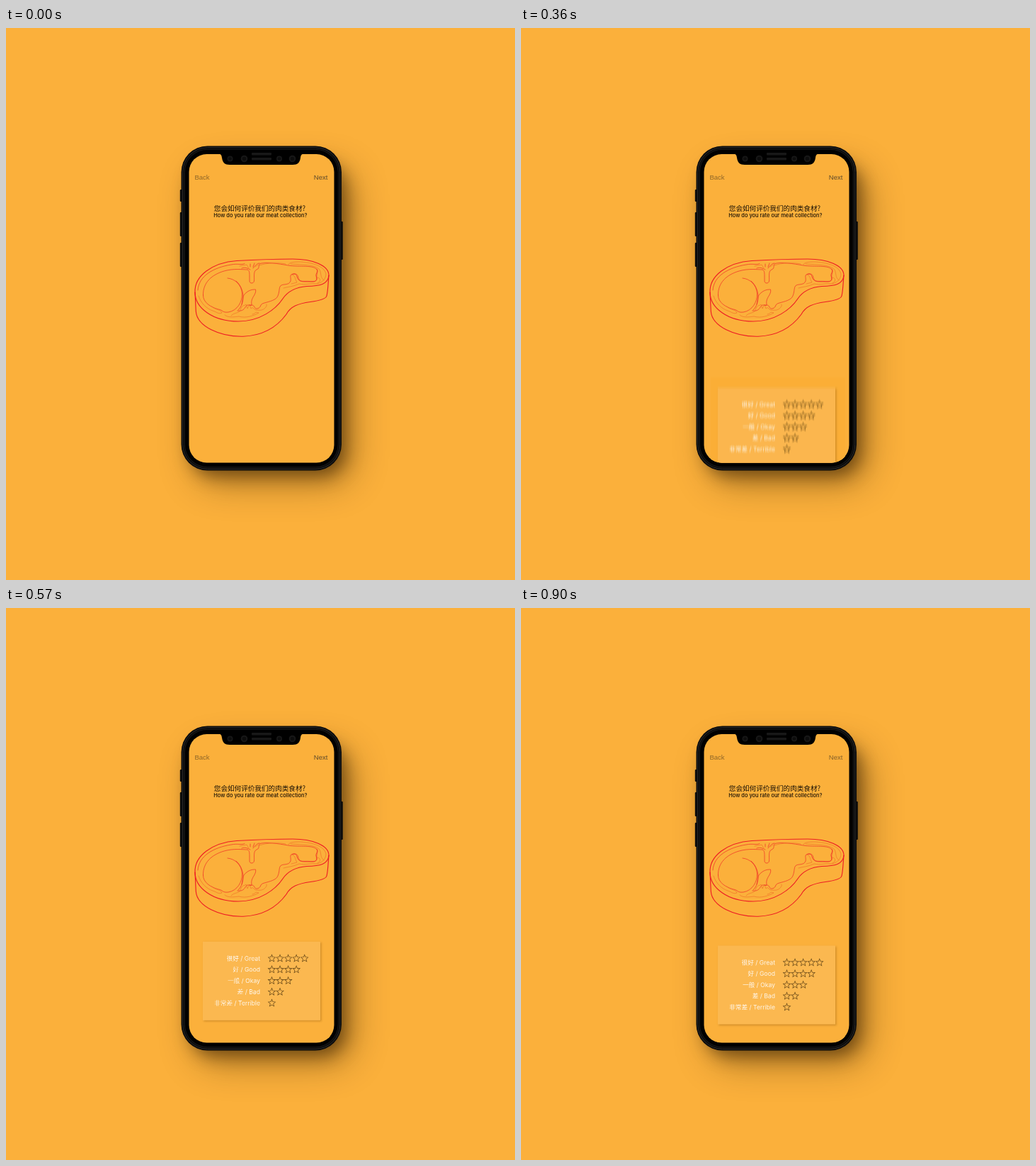
An HTML page with a canvas for the animation above (1.08 s loop, 719 by 779 pixels).

```html
<!DOCTYPE html>
<html lang="en">
<head>
<meta charset="utf-8">
<title>Rating screen</title>
<style>
html, body { margin: 0; width: 100%; height: 100%; overflow: hidden; background: #fbb03b; }
canvas { display: block; }
</style>
</head>
<body>
<canvas id="stage" width="719" height="779"></canvas>
<script>
const W = 719, H = 779, LOOP = 1080, STEP = 30;
const BG = '#fbb03b', RED = '#ed1c24', FINE = '#ee6a26';
const SANS = 'Inter, "Noto Sans CJK SC", "Noto Sans CJK", sans-serif';
const ctx = document.getElementById('stage').getContext('2d');

function layer(w, h, scale = 1) {
  const c = document.createElement('canvas');
  c.width = w * scale;
  c.height = h * scale;
  const g = c.getContext('2d');
  g.scale(scale, scale);
  return [c, g];
}

function box(g, x, y, w, h, r, fill) {
  g.beginPath();
  g.roundRect(x, y, w, h, r);
  g.fillStyle = fill;
  g.fill();
}

function ring(g, x, y, w, h, r, color, width) {
  g.beginPath();
  g.roundRect(x, y, w, h, r);
  g.strokeStyle = color;
  g.lineWidth = width;
  g.stroke();
}

function dot(g, x, y, r, fill) {
  g.beginPath();
  g.arc(x, y, r, 0, Math.PI * 2);
  g.fillStyle = fill;
  g.fill();
}

function line(g, d, color, width) {
  g.strokeStyle = color;
  g.lineWidth = width;
  g.stroke(new Path2D(d));
}

function label(g, text, x, y, font, color, align = 'left') {
  g.font = font;
  g.fillStyle = color;
  g.textAlign = align;
  g.fillText(text, x, y);
}

function drawPhone(g) {
  const cast = (dx, dy, blur, alpha) => {
    g.save();
    g.shadowColor = `rgba(50,28,0,${alpha})`;
    g.shadowBlur = blur;
    g.shadowOffsetX = dx;
    g.shadowOffsetY = dy;
    box(g, 252, 180, 220, 442, 34, '#000');
    g.restore();
  };
  cast(16, 20, 50, 0.42);
  cast(8, 10, 22, 0.5);

  for (const [y, h] of [[228, 17], [260, 34], [303, 34]]) box(g, 245.8, y, 4, h, 1, '#0c0c0c');
  box(g, 472, 273, 3.8, 54, 1, '#0c0c0c');
  box(g, 247.5, 166.5, 226.5, 458, 37, '#0b0b0b');
  ring(g, 249.6, 168.6, 222.3, 453.8, 35, '#2b2b2b', 1);
  ring(g, 252.3, 171.3, 216.9, 448.4, 32, '#1c1c1c', 0.8);
  box(g, 253, 172, 215.5, 447, 31.5, '#000');
  box(g, 258.5, 178, 205, 435.5, 25, BG);

  g.fillStyle = '#000';
  g.fill(new Path2D('M301 177H420V178C417 178 416.5 180 416 183C415 190 412 193 405 193H316C309 193 306 190 305 183C304.5 180 304 178 301 178Z'));
  for (const [x, r] of [[316.5, 4], [336.5, 4.8], [386, 4], [404.5, 4.8]]) {
    dot(g, x, 184.5, r, '#171717');
    dot(g, x, 184.5, r * 0.55, '#0c0c0c');
  }
  box(g, 347, 176, 28, 3.6, 1, '#181818');
  box(g, 347, 183, 28, 3.6, 1, '#181818');
}

function drawSteak(g) {
  g.lineJoin = g.lineCap = 'round';
  // fat and muscle
  for (const d of [
    'M271 370C272 350 293 338 318 334C328 332 333 335 337 332.5',
    'M278.5 377C278 359 291 348 308 343C322 339 334 341 341 341C344 342 344 346 344 351V357C344 361 350 361 350.5 357C351 351 349 343 354 341C360 339 354 333 361 332C374 330 391 334 402 335.5C418 337 438 334 440 343C440 346 438 349 439 352C440 358 435 358 428 357.5C421 357 415 359 413 353C412 347 409 346 404 347.5C400 349 403 353 402 357C400 363 393 361 389 363C385 365 387 371 384 378C382 384 372 386 365 388C357 390 362 394 355 396C350 397 352 391 347 391C342 392 341 389 338 394C336 398 332 400 327 399',
    'M278.5 377C278 387 289 394 300 397C307 398 305 402 314 401C327 399 334 386 333.5 375C333 363 324 354 313 353',
    'M328 398C333 393 335 386 335 379C335 369 329 360 325 357',
    'M333 390C335 382 333 378 340 373C345 369 350 369 352.5 369C354 375 348 379 347 385C346 389 349 393 344 391',
    'M404 348C407 346 410 347 411 351C413 358 418 358 424 358H434C438 358 440 355 438 350C437 346 442 344 439 340',
    'M345 341C341 339 338 337 333 339M349 339C352 335 355 332 358 332M345 337V333M349 337L351 332'
  ]) line(g, d, RED, 0.62);
  for (const d of [
    'M272 378C275 388 283 396 292 399C298 401 300 404 305 402C304 397 295 398 291 393',
    'M309 405C313 409 322 408 329 407C339 410 350 406 357 402C350 400 354 403 348 404',
    'M318 406C322 401 330 403 331 398C334 389 337 393 339 390L341 396L344 390L346 396C350 392 349 399 356 398C364 400 370 392 368 390',
    'M399 334C399 330 412 329 425 331C439 333 450 338 452 347C452 355 445 361 437 361C428 360 424 363 414 361C406 365 399 365 392 367',
    'M402 333C419 334 435 334 442 340C446 344 443 352 449 356M440 352C445 353 445 358 440 360',
    'M405 349C408 348 408 354 411 359L403 361M358 335C369 331 387 331 395 333',
    'M330 336L340 334L343 339M352 337L356 334'
  ]) line(g, d, FINE, 0.6);
  // outline and side
  line(g, 'M267 373C266 350 291 331 326 328.5C352 327 380 326 405 326C433 326 456 335 456 349C455 362 443 364 425 364.5C407 366 397 373 391 382C381 397 359 414 328 414C292 414 267 395 267 373Z', RED, 1.15);
  line(g, 'M267 373L268.3 400C270 421 302 436 335 435.2C366 434 385 419 396 404C402 393 412 389 430 386.5C441 385 452 383 453 378C455 370 455 359 456 349', RED, 1.15);
}

// Card sprite: opaque, with margins so that shifted copies can be averaged.
const CARD = { x: 268, w: 190, top: 14, h: 150 };
const ROWS = ['很好 / Great', '好 / Good', '一般 / Okay', '差 / Bad', '非常差 / Terrible'];

function star(g, x, y, r) {
  g.beginPath();
  for (let i = 0; i < 10; i++) {
    const a = i * Math.PI / 5 - Math.PI / 2, k = i % 2 ? r * 0.44 : r;
    g.lineTo(x + k * Math.cos(a), y + k * Math.sin(a));
  }
  g.closePath();
  g.stroke();
}

function drawCard(g) {
  g.fillStyle = BG;
  g.fillRect(0, 0, CARD.w, CARD.h);
  g.translate(-CARD.x, CARD.top);
  g.save();
  g.shadowColor = 'rgba(120,70,0,.32)';
  g.shadowBlur = 5;
  g.shadowOffsetX = g.shadowOffsetY = 3;
  g.fillStyle = '#fbb850';
  g.fillRect(278, 0, 166, 111);
  g.restore();
  g.strokeStyle = 'rgba(45,28,0,.72)';
  g.lineWidth = 0.7;
  ROWS.forEach((text, i) => {
    const y = 23.7 + i * 15.75;
    label(g, text, 359, y + 3.2, '8.6px ' + SANS, 'rgba(255,255,255,.9)', 'right');
    for (let n = 0; n < 5 - i; n++) star(g, 375.5 + n * 11.55, y + 0.2, 5.3);
  });
}

// Card top every 60 ms from 120 ms on.
const TOPS = [611, 586, 559.5, 532, 507.5, 488, 477, 472, 470, 470.3, 473, 475.8, 476.5];

function cardTop(t) {
  const u = (t - 120) / 60;
  if (u >= TOPS.length - 1) return 476.5;
  const i = Math.floor(u), f = u - i;
  const at = k => k < 0 ? TOPS[0] - 25 * k : TOPS[Math.min(k, TOPS.length - 1)];
  const [a, b, c, d] = [at(i - 1), at(i), at(i + 1), at(i + 2)];
  return b + f / 2 * (c - a + f * (2 * a - 5 * b + 4 * c - d + f * (3 * (b - c) + d - a)));
}

const [scene, sg] = layer(W, H);
sg.fillStyle = BG;
sg.fillRect(0, 0, W, H);
drawPhone(sg);
drawSteak(sg);
label(sg, 'Back', 266.5, 214, '9.5px "Liberation Sans", Arial, sans-serif', '#8f6729');
label(sg, '您会如何评价我们的肉类食材?', 293.8, 258.3, '9.6px "Noto Sans CJK SC", "Noto Sans CJK", sans-serif', '#1a1206');
label(sg, 'How do you rate our meat collection?', 293.3, 266.6, '500 7.45px ' + SANS, '#1a1206');

const [card, cg] = layer(CARD.w, CARD.h, 2);
drawCard(cg);

const screen = new Path2D();
screen.roundRect(258.5, 178, 205, 435.5, 25);

function render(t) {
  t = Math.floor(t / STEP) * STEP;
  ctx.drawImage(scene, 0, 0);
  label(ctx, 'Next', 434.8, 214, '9.5px "Liberation Sans", Arial, sans-serif', t < 900 ? '#5e4a2c' : '#84602a');
  if (t < 120) return;

  // Motion blur: running average over half a step.
  const shutter = STEP / 2;
  const travel = Math.abs(cardTop(t + shutter / 2) - cardTop(t - shutter / 2));
  const count = travel < 0.7 ? 1 : 10;
  ctx.save();
  ctx.clip(screen);
  for (let i = 0; i < count; i++) {
    const y = cardTop(t + shutter * ((i + 0.5) / count - 0.5));
    ctx.globalAlpha = 1 / (i + 1);
    ctx.drawImage(card, CARD.x, y - CARD.top, CARD.w, CARD.h);
  }
  ctx.restore();
}

let start;
function tick(now) {
  start ??= now;
  render(Math.max(0, now - start) % LOOP);
  requestAnimationFrame(tick);
}
render(0);
requestAnimationFrame(tick);
</script>
</body>
</html>
```
